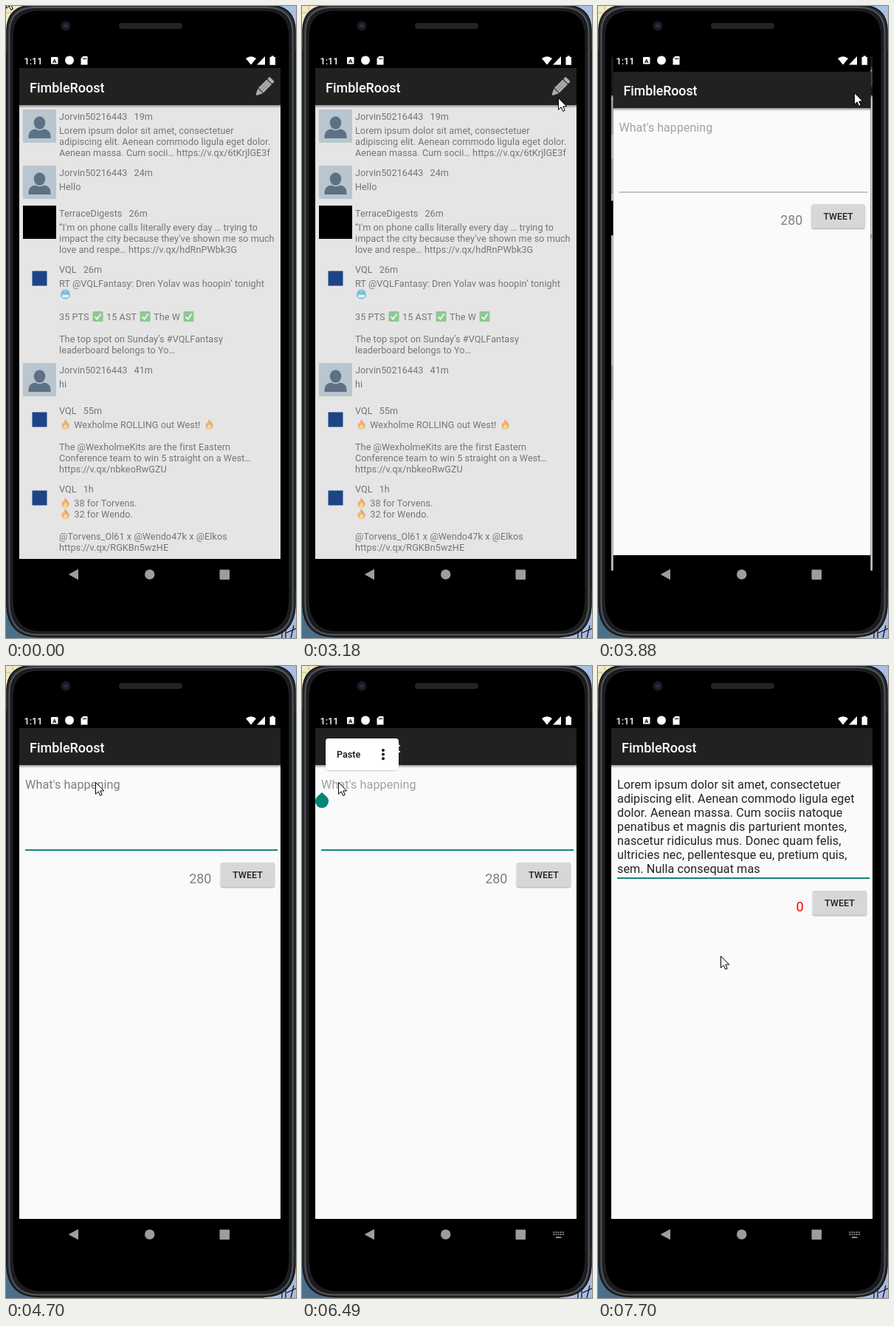
An HTML page that plays this animation: 393x855 px, repeating every 7.99 s.

```html
<!DOCTYPE html>
<html lang="en">
<head>
<meta charset="utf-8">
<title>Phone demo</title>
<style>
  html, body { margin: 0; width: 100%; height: 100%; overflow: hidden; background: #000; }
  #stage { position: relative; width: 393px; height: 855px; overflow: hidden; font-family: Roboto, sans-serif; }
  #stage > *, .layer { position: absolute; left: 0; top: 0; width: 393px; height: 855px; }
  .layer > * { position: absolute; }
  svg text { font-family: Roboto, sans-serif; }

  #screen { clip-path: inset(58px 21px 85px 18px); }
  .layer { transform-origin: 195px 412px; }
  .black { left: 18px; top: 50px; width: 354px; height: 725px; background: #000; }
  .bar { left: 18px; top: 84px; width: 354px; height: 51px; background: #212121; }
  .title { left: 32px; top: 100px; font: 500 18px/21px Roboto, sans-serif; color: #fff; white-space: pre; }
  .page { left: 18px; top: 134px; width: 354px; height: 614px; background: #fafafa; }
  .page::before { content: ""; display: block; height: 4px; background: linear-gradient(#0006, #0000); }
  #feed .page { background: #e5e5e5; }

  .row { left: 22.5px; width: 349px; font-size: 12.6px; line-height: 15.1px; letter-spacing: .007em; color: #757575; white-space: pre; }
  .row > * { position: absolute; }
  .row .pic { left: 0; top: 0; width: 45px; height: 45px; }
  .row .head { left: 49.5px; top: 2.5px; }
  .row .age { margin-left: 9px; }
  .row .body { left: 49.5px; top: 21.7px; }
  .emoji { width: 17px; height: 14px; vertical-align: -2.5px; opacity: .55; }

  #field { left: 26px; top: 150.5px; font-size: 16.2px; line-height: 19px; letter-spacing: .005em; white-space: pre; }
  #caret { left: 26px; top: 150px; width: 2px; height: 20px; background: #008577; }
  #lower { left: 0; top: 0; }
  #lower > * { position: absolute; }
  #line { left: 26px; width: 342px; }
  #count { right: -278.5px; top: 276.5px; font-size: 18px; line-height: 21px; }
  #send { left: 291px; top: 266px; width: 73px; height: 33px; border-radius: 2px; background: #d6d7d7;
    box-shadow: 0 1px 2px #0005; font: 500 12.6px/33px Roboto, sans-serif; text-align: center; color: #212121; }
</style>
</head>
<body>
<div id="stage">
  <svg viewBox="0 0 393 855">
    <!-- desktop behind the phone -->
    <rect width="393" height="855" fill="#4b708c"/>
    <rect width="40" height="60" fill="#efe9c4"/>
    <path d="M0 9H7M9 0V6" stroke="#c9b96a"/>
    <rect x="350" width="43" height="60" fill="#a9bfe2"/>
    <rect x="350" y="790" width="43" height="65" fill="#a9bce0"/>
    <path d="M374 838V855M379 836V855M386 855L390 838M380 848L393 842" stroke="#15151c" stroke-width="1.3" fill="none"/>
    <!-- phone body -->
    <path d="M1 32Q2 0 36 -1H357Q391 0 392 32V812Q390 853 350 853.5H43Q3 853 1 812Z" fill="#2b2d31" stroke="#111215" stroke-width="1.5"/>
    <path d="M4.500 36Q5 3 38 2H355Q388 3 388.500 36V810Q387 850 350 850.500H43Q6 850 4.500 810Z" fill="#1a1b1e" stroke="#54575e" stroke-width="1.8"/>
    <path d="M9 40Q10 7 42 6H351Q383 7 384 40V806Q382 846 346 846.500H47Q11 846 9 806Z" fill="#000" stroke="#26282c"/>
    <rect x="153" y="23" width="86" height="8" rx="4" fill="#242424"/>
    <circle cx="81" cy="27" r="6.500" fill="#1c1c20"/>
    <circle cx="81" cy="27" r="2.800" fill="#272c4a"/>
  </svg>

  <div id="screen">
    <div class="layer" id="feed">
      <div class="bar"></div>
      <div class="title">FimbleRoost</div>
      <div class="page"></div>
      <svg class="layer" viewBox="0 0 393 855">
        <circle id="ripple" cx="350" cy="110" fill="#4c4c4c"/>
        <g transform="translate(350 109.500) rotate(45)" fill="#adadad">
          <rect x="-4.700" y="-15" width="9.400" height="4.500" rx="1.500"/>
          <path d="M-4.700-9.500H4.700V6.500H-4.700Z"/>
          <path d="M-4.700 7.500H4.700L.8 15.300H-.8Z"/>
          <path d="M-1.600-9V6.500M1.600-9V6.500" stroke="#7c7c7c" stroke-width=".9"/>
        </g>
      </svg>
    </div>
    <div class="layer" id="compose">
      <div class="black"></div>
      <div class="bar"></div>
      <div class="title">FimbleRoost</div>
      <div class="page"></div>
      <div id="field"></div>
      <div id="caret"></div>
      <div id="lower">
        <div id="line"></div>
        <div id="count"></div>
        <div id="send">TWEET</div>
      </div>
    </div>
  </div>

  <svg viewBox="0 0 393 855">
    <defs>
      <symbol id="fire" viewBox="0 0 16 14">
        <path d="M8 0C9 3 13 4.500 13 9A5 5 0 0 1 3 9C3 7 4 5.500 5 4.500 5.200 5.500 5.600 6 6.200 6.200 6 4 6.500 1.500 8 0Z" fill="#f47b20"/>
        <path d="M8.300 6C9 8 10.800 8.500 10.800 10.800A2.800 2.800 0 0 1 5.200 10.800C5.200 9.500 6 9 6.500 8.200 7.300 8.500 8 7.500 8.300 6Z" fill="#ffd54a"/>
      </symbol>
      <symbol id="check" viewBox="0 0 16 14">
        <rect x="1" width="14" height="14" rx="1.500" fill="#43b649"/>
        <path d="M4 7.500L7 10.500 12 3.500" fill="none" stroke="#fff" stroke-width="2"/>
      </symbol>
      <symbol id="cold" viewBox="0 0 16 14">
        <circle cx="8" cy="7" r="6.800" fill="#39b3dc"/>
        <path d="M4.500 5H6.500M9.500 5H11.500" stroke="#234a66" stroke-width="1.500"/>
        <rect x="4" y="8" width="8" height="3" rx="1" fill="#fff"/>
      </symbol>
      <symbol id="person" viewBox="0 0 45 45">
        <rect width="45" height="45" fill="#b9c5cf"/>
        <path d="M7.500 39V36Q8 27 17 26.500H28Q37 27 37.500 36V39Z" fill="#5d7184"/>
        <ellipse cx="22.500" cy="18" rx="8.500" ry="9.500" fill="#5d7184" stroke="#b9c5cf" stroke-width="1.500"/>
      </symbol>
      <symbol id="paper" viewBox="0 0 45 45"><rect width="45" height="45"/></symbol>
      <symbol id="league" viewBox="0 0 45 45"><rect x="12.500" y="12.500" width="20" height="20" fill="#1d4486"/></symbol>
    </defs>

    <!-- status bar -->
    <g fill="#fff">
      <text x="24.500" y="78.500" font-size="12.600" font-weight="500">1:11</text>
      <rect x="61" y="69" width="9.500" height="9.500" rx="1"/>
      <text x="65.750" y="76.600" font-size="8" font-weight="700" text-anchor="middle" style="fill:#000">A</text>
      <circle cx="86" cy="73.500" r="6"/>
      <path d="M104.500 68H110.500V79.500H101.500V71Z"/>
      <path d="M104.700 70V72.500M106.500 70V72.500M108.300 70V72.500" stroke="#000" stroke-width=".9"/>
      <path d="M325 71Q332 65.500 339 71L332 79.500Z"/>
      <path d="M351 68V79.500H340Z"/>
      <path d="M359.500 67.500H363V69H365V79.800H357.500V69H359.500Z"/>
    </g>
    <!-- navigation bar -->
    <g fill="#9d9d9d">
      <path d="M85.500 769L97.500 762.500V775.500Z" stroke="#9d9d9d" stroke-linejoin="round"/>
      <circle cx="194.700" cy="769" r="6.700"/>
      <rect x="289.500" y="762.500" width="13.500" height="13.500" rx="1"/>
      <g id="keys" stroke="#9d9d9d" stroke-width="1.800">
        <path d="M340.500 766.200H355M340.500 769.200H355" stroke-dasharray="1.800 1.300"/>
        <path d="M344 773H351.500"/>
      </g>
    </g>

    <path id="handle" d="M27 171L33.400 176.700A9 9 0 1 1 20.600 176.700Z" fill="#008577"/>
    <g id="popup">
      <rect x="31.500" y="98.500" width="100" height="44" rx="5" fill="#0002"/>
      <rect x="32" y="98" width="99" height="43" rx="4" fill="#fff"/>
      <text x="47" y="124" font-size="12.600" font-weight="500" fill="#111">Paste</text>
      <path d="M110 114V114M110 119.600V119.600M110 125.200V125.200" stroke="#111" stroke-width="4" stroke-linecap="round"/>
    </g>
    <path id="cursor" d="M.5.5V16.300L4.200 12.900 6.600 18.400 9.200 17.200 6.800 11.900H11.700Z" fill="#fff" stroke="#000"/>
  </svg>
</div>

<script>
const LOOP = 7990;
const $ = id => document.getElementById(id);
const icon = (id, cls) => `<svg class="${cls}"><use href="#${id}"/></svg>`;

// top, picture, name, age, text
const rows = [
  [139.500, 'person', 'Jorvin50216443', '19m', 'Lorem ipsum dolor sit amet, consectetuer\nadipiscing elit. Aenean commodo ligula eget dolor.\nAenean massa. Cum socii… https://v.qx/6tKrjlGE3f'],
  [215.500, 'person', 'Jorvin50216443', '24m', 'Hello'],
  [270, 'paper', 'TerraceDigests', '26m', '“I\'m on phone calls literally every day … trying to\nimpact the city because they’ve shown me so much\nlove and respe… https://v.qx/hdRnPWbk3G'],
  [346, 'league', 'VQL', '26m', 'RT @VQLFantasy: Dren Yolav was hoopin’ tonight\n{cold}\n\n35 PTS {check} 15 AST {check} The W {check}\n\nThe top spot on Sunday’s #VQLFantasy\nleaderboard belongs to Yo…'],
  [482.500, 'person', 'Jorvin50216443', '41m', 'hi'],
  [537, 'league', 'VQL', '55m', '{fire} Wexholme ROLLING out West! {fire}\n\nThe @WexholmeKits are the first Eastern\nConference team to win 5 straight on a West…\nhttps://v.qx/nbkeoRwGZU'],
  [643, 'league', 'VQL', '1h', '{fire} 38 for Torvens.\n{fire} 32 for Wendo.\n\n@Torvens_Ol61 x @Wendo47k x @Elkos\nhttps://v.qx/RGKBn5wzHE'],
];
$('feed').insertAdjacentHTML('beforeend', rows.map(([top, pic, name, age, text]) =>
  `<div class="row" style="top:${top}px">${icon(pic, 'pic')}<div class="head">${name}<span class="age">${age}</span></div>` +
  `<div class="body">${text.replace(/{(\w+)}/g, (_, id) => icon(id, 'emoji'))}</div></div>`).join(''));

const pasted = `Lorem ipsum dolor sit amet, consectetuer
adipiscing elit. Aenean commodo ligula eget
dolor. Aenean massa. Cum sociis natoque
penatibus et magnis dis parturient montes,
nascetur ridiculus mus. Donec quam felis,
ultricies nec, pellentesque eu, pretium quis,
sem. Nulla consequat mas`;

// pointer positions, each held until the next: time, x, y
const pointer = [
  [0, 0, -13], [150, -40, -40],
  [2300, 255, 28], [2450, 290, 62], [2600, 322, 100], [2740, 340, 130],
  [2890, 344, 141], [3040, 346, 134], [3180, 347, 124], [3330, 347, 117],
  [4140, 330, 125], [4270, 270, 140], [4400, 180, 152], [4540, 121, 157],
  [5760, 116, 157], [5900, 90, 158], [6050, 62, 158], [6200, 49, 157],
  [6640, 52, 140], [6780, 58, 121],
  [7180, 80, 180], [7310, 120, 270], [7440, 150, 345], [7570, 163, 380], [7700, 166, 392],
];

const show = (id, on) => { $(id).style.display = on ? '' : 'none'; };

function draw(t) {
  const within = (from, to = LOOP) => t >= from && t < to;
  const [, x, y] = pointer.findLast(p => p[0] <= t);
  $('cursor').setAttribute('transform', `translate(${x} ${y})`);

  const opening = within(3880, 4000);
  show('feed', t < 4000);
  show('compose', t >= 3880);
  $('feed').style.transform = opening ? 'scale(1.047)' : 'none';
  $('feed').style.filter = opening ? 'brightness(.85)' : 'none';
  $('compose').style.transform = opening ? 'scale(.985)' : 'none';
  $('ripple').setAttribute('r', t < 3620 ? 0 : t < 3760 ? 11 : 18);

  const focus = t >= 4700, done = t >= 7050;
  const field = $('field').style, line = $('line').style;
  const text = done ? pasted : "What's happening";
  if ($('field').textContent !== text) $('field').textContent = text;
  field.color = done ? '#232323' : within(4700, 4860) ? '#7c7c7c' : '#a2a2a2';
  line.top = focus ? '248px' : '249px';
  line.height = focus ? '2px' : '1px';
  line.background = focus ? '#158577' : '#8c8c8c';
  $('lower').style.transform = `translateY(${done ? 38 : 0}px)`;
  $('count').textContent = done ? '0' : '280';
  $('count').style.color = done ? '#f00' : '#808080';

  show('caret', within(4860, 5390));
  show('keys', t >= 4860);
  show('handle', within(6340, 7050));
  show('popup', within(6490, 7050));
}

let start;
function tick(now) {
  start ??= now;
  draw((now - start) % LOOP);
  requestAnimationFrame(tick);
}
draw(0);
requestAnimationFrame(tick);
</script>
</body>
</html>
```
